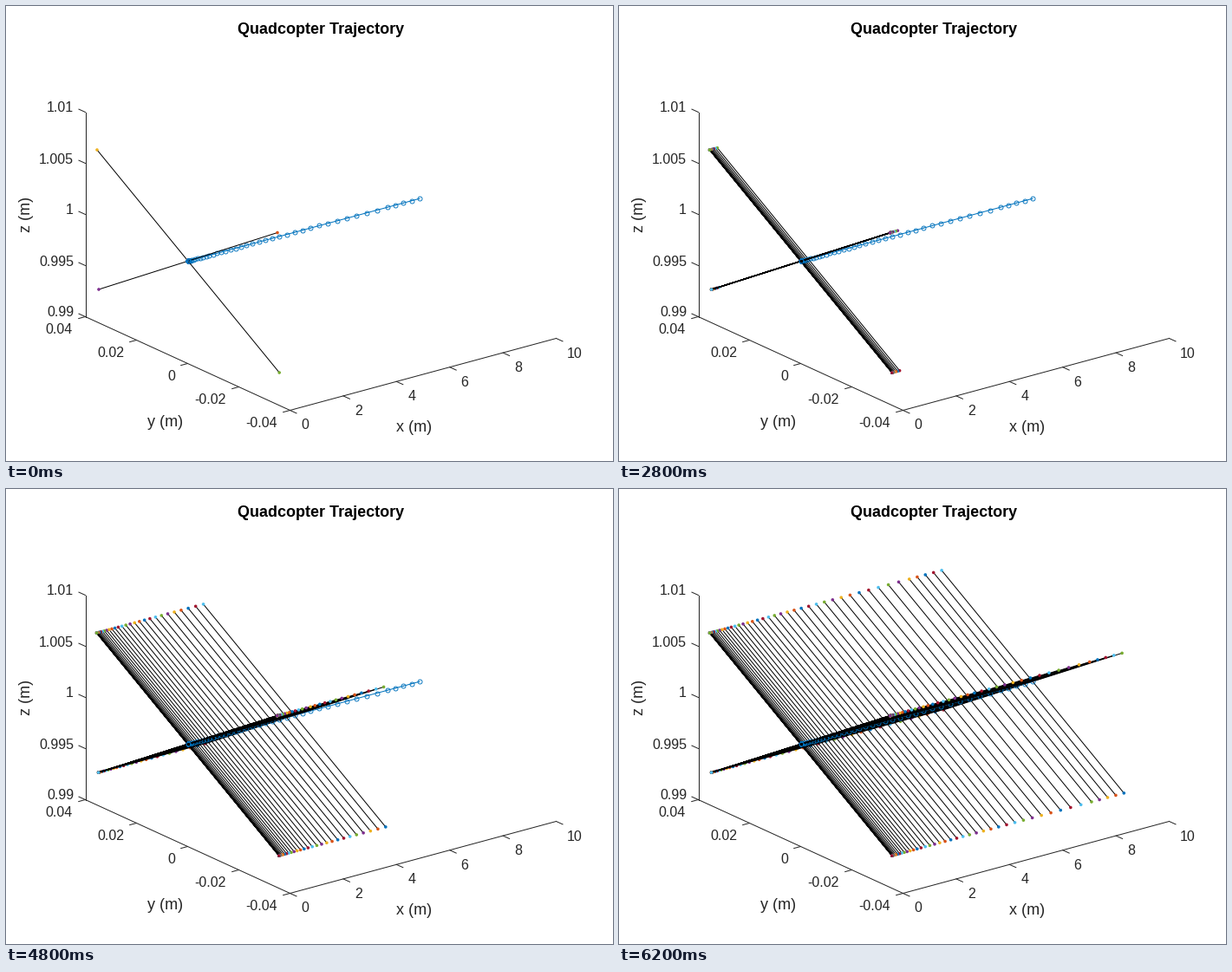
Recreate the animation shown at these times as a matplotlib script. Size 700 px wide and 525 px high, loop 6.3 s.

```python
import numpy as np
import matplotlib.pyplot as plt
from matplotlib.animation import FuncAnimation

W, H, DPI = 700, 525, 100
PX = 72 / DPI                      # points per pixel
FRAMES, INTERVAL = 63, 100
STEPS = 61
INK = "#262626"
COLORS = ["#0072BD", "#D95319", "#EDB120", "#7E2F8E",
          "#77AC30", "#4DBEEE", "#A2142F"]

plt.rcParams["font.family"] = "Liberation Sans"
fig = plt.figure(figsize=(W / DPI, H / DPI), dpi=DPI, facecolor="white")
ax = fig.add_axes([0, 0, 1, 1])
ax.set(xlim=(0, W), ylim=(H, 0))
ax.axis("off")

# Projected axis corners, in pixels
TOP = np.array([91.5, 122.5])
LEFT = np.array([91.5, 358.5])
FRONT = np.array([327.5, 466.5])
RIGHT = np.array([634.5, 383.5])
SLOPE = -0.27


def stroke(a, b):
    ax.plot([a[0], b[0]], [a[1], b[1]], color=INK, lw=PX)


def label(x, y, s, size=16, **kw):
    kw = {"color": INK, "ha": "center", "va": "baseline", **kw}
    ax.text(x, y, s, fontsize=size * PX, **kw)


def axis(a, b, tick, names, at, step, ha):
    """Axis line from a to b with evenly spaced ticks and labels."""
    stroke(a, b)
    for i, name in enumerate(names):
        p = a + (b - a) * i / (len(names) - 1)
        stroke(p, p + tick)
        label(at[0] + step[0] * i, at[1] + step[1] * i, name, ha=ha)


axis(LEFT, TOP, (-7.5, -3.4), ["0.99", "0.995", "1", "1.005", "1.01"],
     (78, 358.5), (0, -59), "right")
axis(LEFT, FRONT, (-7.8, 2.1), ["0.04", "0.02", "0", "-0.02", "-0.04"],
     (77, 377.5), (59, 27.2), "right")
axis(FRONT, RIGHT, (7.5, 3.4), ["0", "2", "4", "6", "8", "10"],
     (340.7, 488.5), (61.3, -16.6), "left")

label(363, 32, "Quadcopter Trajectory", 18, weight="bold", color="black")
label(470.5, 491, "x (m)", 18)
label(184, 485, "y (m)", 18)
label(27.5, 240, "z (m)", 18, rotation=90, rotation_mode="anchor")


def travel(m):
    """Horizontal pixels covered after m steps: tiny dip, speed-up, cruise."""
    if m < 18.9:
        return -0.4 * m * m * max(18 - m, 0) / 864
    if m <= 56:
        return 0.1669 * (m - 18.9) ** 2
    return 229.5 + 9.4 * (m - 56)


CENTER = np.array([210, 294.3])
# right, top, left, bottom rotor
TIPS = np.array([[313, 261.5], [105, 166], [107, 327], [315.2, 423]])

dist = [travel(m) for m in range(STEPS)]
shift = [np.array([d, SLOPE * d]) for d in dist]


def depth(d):
    return 1000 - d


for m in range(STEPS):
    x, y = CENTER + shift[m]
    ax.plot(x, y, "o", ms=5 * PX, mfc="none", mec=COLORS[0], mew=0.9 * PX,
            zorder=depth(dist[m]) + 0.002)
    if m:
        p, q = CENTER + shift[m - 1], CENTER + shift[m]
        ax.plot([p[0], q[0]], [p[1], q[1]], color=COLORS[0], lw=PX,
                zorder=depth((dist[m] + dist[m - 1]) / 2))

poses = []
for m in range(STEPS):
    tips = TIPS + shift[m]
    r, t, l, b = tips
    z = depth(dist[m])
    arms, = ax.plot([r[0], l[0], np.nan, t[0], b[0]],
                    [r[1], l[1], np.nan, t[1], b[1]],
                    color="black", lw=PX, zorder=z)
    dots = ax.scatter(tips[:, 0], tips[:, 1], s=(3.6 * PX) ** 2, linewidths=0,
                      c=[COLORS[(1 + i + 6 * m) % 7] for i in range(4)],
                      zorder=z + 0.001)
    poses.append((arms, dots))


def update(n):
    # the picture holds for one extra beat twice
    last = n - (n >= 2) - (n >= 11)
    for m, pose in enumerate(poses):
        for artist in pose:
            artist.set_visible(m <= last)
    return []


anim = FuncAnimation(fig, update, frames=FRAMES, interval=INTERVAL,
                     init_func=lambda: update(0), repeat=True,
                     repeat_delay=0, blit=False)
plt.show()
```
